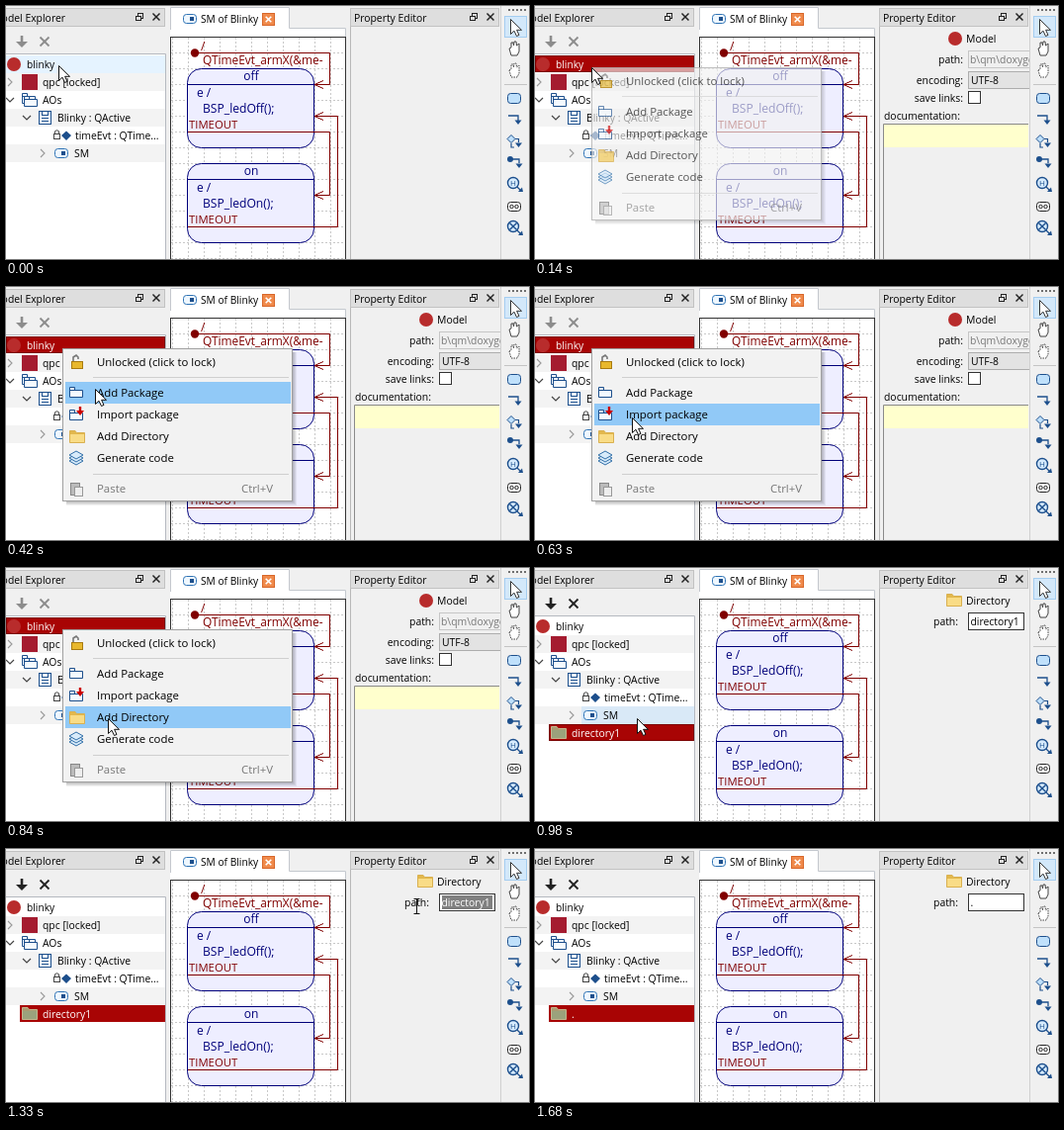
Write an HTML page with a canvas that moves like this. It is 529x256 px and loops after 1750 ms.

```html
<!DOCTYPE html>
<html lang="en">
<head>
<meta charset="utf-8">
<title>State machine editor</title>
<style>
  html, body { margin: 0; width: 100%; height: 100%; overflow: hidden; background: #f0f0f0; }
  canvas { display: block; width: 529px; height: 256px; }
</style>
</head>
<body>
<canvas id="stage" width="529" height="256"></canvas>
<script>
const g = document.getElementById('stage').getContext('2d');
const LOOP = 1750, STEP = 70;
const UI = '"Open Sans", "Noto Sans", sans-serif';
const NAVY = '#00007a', MAROON = '#800000', RED = '#a80404', BLUE = '#1d4f8c';

// Pointer waypoints: time, x, y
const PATH = [
  [0, 53, 60], [140, 57, 62], [280, 60, 66], [350, 79, 90], [420, 90, 103],
  [560, 96, 124], [630, 98, 132], [840, 103, 152], [1050, 103, 152],
  [1190, 490, 56], [1330, 415, 58], [1400, 418, 58], [1750, 418, 58]
];

function pointerAt(t) {
  const i = Math.max(1, PATH.findIndex(p => p[0] >= t));
  const [a, b] = [PATH[i - 1], PATH[i]];
  const k = (t - a[0]) / (b[0] - a[0]);
  return { x: Math.round(a[1] + (b[1] - a[1]) * k), y: Math.round(a[2] + (b[2] - a[2]) * k) };
}

// Drawing helpers
function box(x, y, w, h, fill, stroke) {
  if (fill) { g.fillStyle = fill; g.fillRect(x, y, w, h); }
  if (stroke) { g.strokeStyle = stroke; g.lineWidth = 1; g.strokeRect(x + .5, y + .5, w - 1, h - 1); }
}
function round(x, y, w, h, r, fill, stroke, width = 1) {
  g.beginPath();
  g.roundRect(x, y, w, h, r);
  if (fill) { g.fillStyle = fill; g.fill(); }
  if (stroke) { g.strokeStyle = stroke; g.lineWidth = width; g.stroke(); }
}
function disc(x, y, r, fill, stroke, width = 1) {
  round(x - r, y - r, 2 * r, 2 * r, r, fill, stroke, width);
}
function trace(pts) {
  g.beginPath();
  for (let i = 0; i < pts.length; i += 2) g.lineTo(pts[i], pts[i + 1]);
}
function line(color, width, ...pts) {
  trace(pts);
  g.strokeStyle = color;
  g.lineWidth = width;
  g.stroke();
}
function poly(fill, stroke, ...pts) {
  trace(pts);
  g.closePath();
  if (fill) { g.fillStyle = fill; g.fill(); }
  if (stroke) { g.strokeStyle = stroke; g.lineWidth = 1; g.stroke(); }
}
function text(s, x, y, color = '#000', size = 10.4, align = 'left') {
  g.font = `${size}px ${UI}`;
  g.textAlign = align;
  g.fillStyle = color;
  g.fillText(s, x, y);
}
function cross(x, y, r, color, width) {
  line(color, width, x - r, y - r, x + r, y + r);
  line(color, width, x + r, y - r, x - r, y + r);
}
function clipped(x, y, w, h, draw) {
  g.save();
  g.beginPath();
  g.rect(x, y, w, h);
  g.clip();
  draw();
  g.restore();
}

// Icons
function folder(x, y, fill, edge) {
  poly(fill, edge, x + .5, y + .5, x + 6, y + .5, x + 7.5, y + 2.5, x + 15.5, y + 2.5, x + 15.5, y + 12.5, x + .5, y + 12.5);
}
function yellowFolder(x, y) {
  folder(x, y, '#e2b84e', '#d9b050');
  box(x + 1, y + 4, 14, 8, '#f9dc86');
}
function packageIcon(x, y) {
  poly('#f4faff', BLUE, x + .5, y + .5, x + 5.5, y + .5, x + 5.5, y + 3.5, x + 13.5, y + 3.5, x + 13.5, y + 10.5, x + .5, y + 10.5);
  line(BLUE, 1, x, y + 3.5, x + 6, y + 3.5);
}
function stateIcon(x, y) {
  round(x + .5, y + .5, 13, 9, 3, '#eef7ff', '#2f73b5');
  box(x + 7, y + 3, 4, 4, BLUE);
}
function chevron(x, y, open) {
  if (open) line('#444', 1.2, x - 4, y - 2, x, y + 2, x + 4, y - 2);
  else line('#999', 1.1, x - 2, y - 4, x + 2, y, x - 2, y + 4);
}

function dockTitle(x, w, label, right, buttons) {
  box(x, 2, w, 19, '#dedede', '#c2c2c2');
  text(label, right, 15.5, '#000', 10.4, 'right');
  box(buttons - 2, 7, 6, 6, null, '#222');
  box(buttons - 4, 10, 6, 5, '#dedede', '#222');
  cross(buttons + 17, 11, 3.5, '#222', 1.5);
}

function explorer(t) {
  dockTitle(-1, 162, 'Model Explorer', 60, 135);
  const tool = t < 980 ? '#8c8c8c' : '#222';
  line(tool, 2.6, 16, 30, 16, 38);
  poly(tool, null, 10, 36, 22, 36, 16, 42);
  cross(39, 36, 4.5, tool, 1.8);

  box(0, 49, 161, 207, '#fff');
  line('#b5b9c0', 1, 0, 48.5, 161.5, 48.5, 161.5, 256);
  for (const y of [68, 104, 140]) box(0, y, 161, 18, '#f3f3f3');

  const rootOn = t >= 70 && t < 980;
  if (t < 70) box(0, 50, 161, 18, '#e5f3ff');
  if (rootOn) selectRow(0, 50, true);
  disc(8, 59, 7, '#b82c2c');
  text('blinky', 21, 63, rootOn ? '#fff' : '#000', 10.2);

  chevron(4, 77);
  box(16, 69, 16, 16, '#a51c30');
  text('qpc [locked]', 37, 81);

  chevron(4, 95, true);
  packageIcon(16, 88);
  packageIcon(18, 91);
  text('AOs', 37, 99);

  chevron(21, 113, true);
  box(33, 106, 13, 14, '#f4faff', BLUE);
  box(36, 106, 7, 5, null, BLUE);
  line(BLUE, 1, 36, 113.5, 43, 113.5);
  line(BLUE, 1, 36, 116.5, 43, 116.5);
  text('Blinky : QActive', 52, 117);

  disc(51.5, 128, 2.2, null, '#444');
  box(48, 129, 7, 6, '#fff', '#444');
  poly(BLUE, null, 61, 126.5, 66, 131, 61, 136, 56, 131);
  text('timeEvt : QTime...', 70, 135);

  if (t >= 980 && t < 1120) box(47, 140, 114, 18, '#d9e9f7');
  chevron(37, 149);
  stateIcon(49, 144);
  text('SM', 69, 153);

  if (t >= 980) {
    selectRow(14, 158, t < 1120);
    folder(16, 160, '#aa9a70', '#c3b58c');
    box(17, 164, 14, 8, '#9ba27c');
    text(pathText(t), 37, 171, '#fff');
  }
}
function selectRow(x, y, focus) {
  box(x, y, 161 - x, 17, RED);
  if (!focus) return;
  g.setLineDash([1, 1]);
  box(x, y, 161 - x, 17, null, '#4a0000');
  g.setLineDash([]);
}
function pathText(t) {
  return t < 1400 ? 'directory1' : t < 1540 ? '' : '.';
}

function diagram() {
  box(166, 22, 178, 234, '#fff');
  box(166, 1, 121, 23, '#fff');
  line('#c4c8ce', 1, 166.5, 24, 166.5, 1.5, 286.5, 1.5, 286.5, 22.5, 343.5, 22.5, 343.5, 32);
  stateIcon(179, 8);
  text('SM of Blinky', 197, 16.5, '#000', 10.2);
  box(259, 7, 13, 13, '#f08a4b', '#d8672a');
  cross(265.5, 13.5, 2.8, '#fff', 1.6);

  box(166, 31, 178, 226, '#fff', '#333');
  clipped(167, 32, 176, 224, () => {
    g.setLineDash([2, 2]);
    for (let x = 168.5; x < 343; x += 16) line('#c8c8c8', 1, x, 32, x, 256);
    for (let y = 47.5; y < 256; y += 16) line('#c8c8c8', 1, 167, y, 343, y);
    g.setLineDash([]);
  });

  stateBox(63, 'off', 'BSP_ledOff();');
  stateBox(159, 'on', 'BSP_ledOn();');

  disc(191, 47.5, 4.2, MAROON);
  wire(191, 47.5, 327.5, 79.5);
  wire(184, 127.5, 327.5, 191.5);
  wire(184, 223.5, 335.5, 111.5);
  text('/', 197, 45, MAROON, 12);
  text('QTimeEvt_armX(&me-', 199, 59, MAROON, 11.9);
  text('TIMEOUT', 185, 124, MAROON, 11.3);
  text('TIMEOUT', 185, 220, MAROON, 11.3);
}
function stateBox(y, name, action) {
  round(183.5, y + .5, 128, 80, 14, '#eeeeff', NAVY);
  line(NAVY, 1, 184, y + 16.5, 311, y + 16.5);
  text(name, 248, y + 12, NAVY, 12, 'center');
  text('e /', 193, y + 29, NAVY, 12);
  text(action, 199, y + 45, NAVY, 12.1);
}
function wire(x, y, bend, end) {
  line(MAROON, 1, x, y, bend, y, bend, end, 312, end);
  line(MAROON, 1, 321, end - 4, 312, end, 321, end + 4);
}

function properties(t) {
  dockTitle(348, 151, 'Property Editor', 425.5, 473);
  line('#b8b8b8', 1, 348.5, 21, 348.5, 256);
  if (t < 70) return;
  if (t < 980) modelForm();
  else directoryForm(t);
}
function label(s, right, y) {
  text(s, right, y, '#000', 10.4, 'right');
}
function modelForm() {
  disc(425, 33, 7, '#b82c2c');
  text('Model', 436, 37);
  label('path:', 433, 58);
  box(438, 45, 63, 18, '#f0f0f0', '#c6c6c6');
  clipped(439, 45, 61, 18, () => text('b\\qm\\doxyge', 440, 58, '#777'));
  label('encoding:', 433, 79);
  box(438, 66, 63, 18, '#e3e3e3', '#adadad');
  text('UTF-8', 441, 78.5);
  label('save links:', 433, 97);
  box(438, 86, 13, 13, '#fff', '#333');
  text('documentation:', 353, 115);
  box(352, 119, 147, 24, '#ffffcd');
  line('#8a8a8a', 1, 499, 119.5, 352.5, 119.5, 352.5, 256);
}
function directoryForm(t) {
  yellowFolder(416, 26);
  text('Directory', 436, 37);
  label('path:', 428, 58);
  box(438, 45, 57, 18, '#fff', '#333');
  const value = pathText(t);
  text(value, 440.5, 58);
  if (t >= 1260 && t < 1400) {
    const x = Math.max(441, pointerAt(t).x);
    clipped(x, 47, 492 - x, 14, () => {
      box(x, 47, 492 - x, 14, '#808080');
      text(value, 440.5, 58, '#fff');
    });
  }
  if (t >= 1400 && t < 1680) box(value ? 445 : 442, 48, 1, 12, '#000');
}

function toolbar() {
  line('#d0d0d0', 1, 500.5, 0, 500.5, 256);
  g.setLineDash([2, 2]);
  line('#444', 1.5, 508, 4, 526, 4);
  g.setLineDash([]);
  box(504, 10, 23, 22, '#d3e8fa', '#a4cdf0');
  arrow(510, 13, '#fff', '#333');
  hand(43);
  g.setLineDash([1.5, 1]);
  hand(65);
  g.setLineDash([]);
  line('#c4c4c4', 1, 504, 79.5, 527, 79.5);

  round(507.5, 88.5, 13, 10, 3, '#bfe0fb', BLUE);

  line(BLUE, 1.3, 508, 111, 518, 111, 518, 116);
  arrowHead(518, 120);

  poly('#bfe0fb', BLUE, 511, 130.5, 515, 134.5, 511, 138.5, 507, 134.5);
  line(BLUE, 1.2, 515, 134.5, 518.5, 134.5, 518.5, 138);
  arrowHead(518.5, 143);
  line(BLUE, 1.2, 511, 139, 511, 143, 514, 143);

  disc(510, 155, 3, BLUE);
  line(BLUE, 1.3, 510, 155, 519, 155, 519, 159);
  arrowHead(519, 164);

  for (const y of [179, 223]) {
    disc(513, y, 5.5, '#d7ecff', BLUE, 1.4);
    line(BLUE, 1.2, 517, y + 4, 521, y + 8);
    poly(BLUE, null, 523, y + 9, 518, y + 9, 522, y + 4.5);
  }
  text('H', 513, 182, BLUE, 8, 'center');
  cross(513, 223, 3.6, BLUE, 1.4);
  round(507.5, 198.5, 13, 9, 3, '#fff', '#222');
  disc(511.5, 203, 1.7, null, '#222');
  disc(516.5, 203, 1.7, null, '#222');
}
function arrowHead(x, y) {
  poly(BLUE, null, x - 3.5, y - 4.5, x + 3.5, y - 4.5, x, y);
}
function hand(y) {
  poly('#fff', '#444', 509, y, 511, y - 1, 511, y - 6, 513, y - 6, 513.5, y - 3, 514, y - 7, 516, y - 7,
    516.5, y - 3, 519, y - 5, 519, y + 3, 517, y + 7, 511, y + 7);
}

// Context menu
const ITEMS = [
  ['Unlocked (click to lock)', 76], ['Add Package', 107], ['Import package', 129],
  ['Add Directory', 151], ['Generate code', 173], ['Paste', 204]
];
function menu(t, p) {
  g.globalAlpha = t < 210 ? .65 : t < 280 ? .88 : 1;
  for (let i = 1; i < 5; i++) {
    const shade = `rgba(0,0,0,${.3 - i * .06})`;
    line(shade, 1, 61, 216.5 + i, 289.5 + i, 216.5 + i, 289.5 + i, 66);
  }
  box(57, 62, 233, 155, '#f2f2f2', '#a0a0a0');
  for (const y of [91, 189]) line('#cfcfcf', 1, 88, y + .5, 286, y + .5);
  for (const [name, y] of ITEMS) {
    if (t >= 350 && p.y >= y - 11 && p.y < y + 11) box(60, y - 11, 228, 22, '#91c9f7');
    text(name, 92, y + 4, name === 'Paste' ? '#777' : '#000', 11.4);
  }
  text('Ctrl+V', 270, 208, '#777', 11.4, 'right');

  line('#777', 1.6, 68, 75, 68, 71, 71, 69, 73, 71, 73, 73);
  box(66, 75, 12, 8, '#e8b82e', '#a87b12');
  packageIcon(64, 101);
  packageIcon(64, 124);
  line('#c00', 2.4, 75, 121, 75, 126);
  poly('#c00', null, 71, 125, 79, 125, 75, 130);
  yellowFolder(64, 145);
  for (const y of [176, 173, 170]) poly('#d8ebfa', '#326fa8', 64, y, 71, y - 4, 78, y, 71, y + 4);
  box(65, 198, 10, 13, '#bbb', '#888');
  box(69, 202, 9, 10, '#eee', '#999');
  g.globalAlpha = 1;
}

function arrow(x, y, fill = '#fff', edge = '#111') {
  poly(fill, edge, x + .5, y + .5, x + .5, y + 15.5, x + 4, y + 12.2, x + 6.5, y + 17.5,
    x + 9, y + 16.4, x + 6.6, y + 11.3, x + 11.5, y + 11.3);
}
function beam(x, y) {
  line('#111', 1, x + .5, y - 7, x + .5, y + 7);
  for (const s of [-1, 1]) line('#111', 1, x - 2.5, y + s * 7.5, x + 3.5, y + s * 7.5);
}

function draw(t) {
  const p = pointerAt(t);
  box(0, 0, 529, 256, '#f0f0f0');
  explorer(t);
  diagram();
  properties(t);
  toolbar();
  if (t >= 140 && t < 980) menu(t, p);
  if (t < 1190) arrow(p.x, p.y);
  else if (t < 1680) beam(p.x, p.y);
}

const start = performance.now();
function tick() {
  const t = (performance.now() - start) % LOOP;
  draw(Math.floor(t / STEP) * STEP);
  requestAnimationFrame(tick);
}
tick();
</script>
</body>
</html>
```
